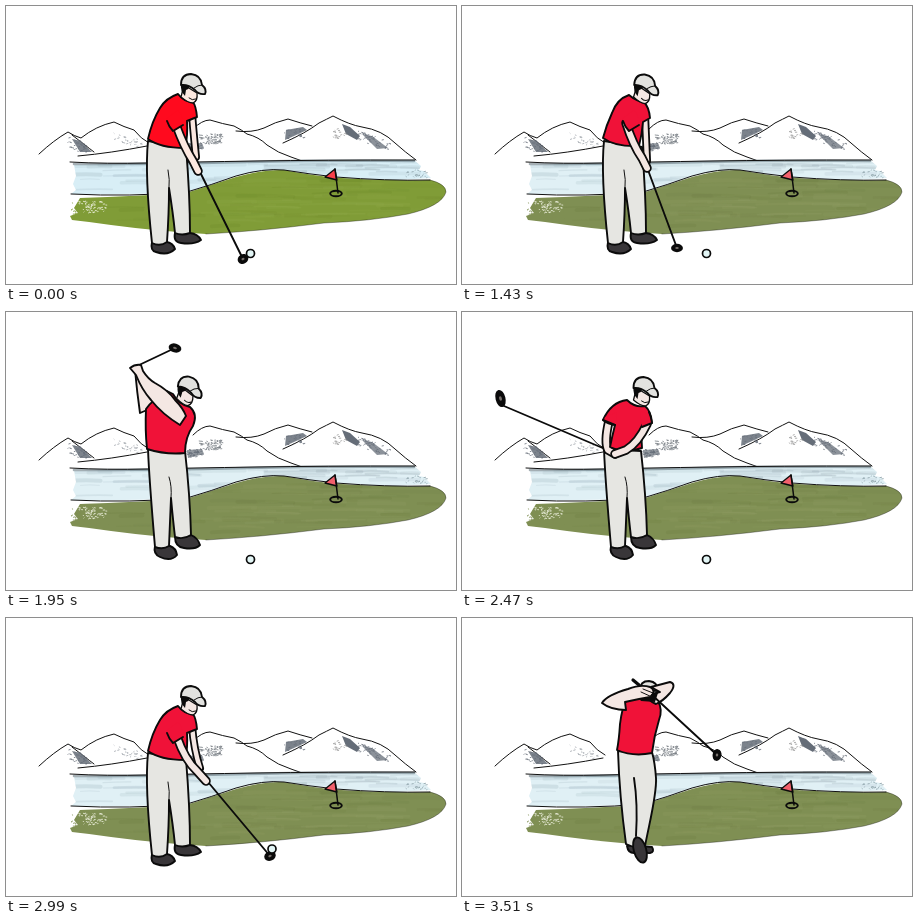
These frames come from a looping animation (450x278 px, 5200 ms). An HTML page:

```html
<!DOCTYPE html>
<html lang="en">
<head>
<meta charset="utf-8">
<title>Golf swing</title>
<style>
html, body { margin: 0; width: 100%; height: 100%; overflow: hidden; background: #fff; }
svg { display: block; width: 100%; height: 100%; --grass: #7f8f53; --dark: #68783d; --light: #93a168; --water: #e0f0f5; --red: #f01238; --skin: #f4e7e3; --flag: #f2606c; }
svg.bright { --grass: #809c37; --dark: #698528; --light: #91aa4c; --water: #d8eef6; --red: #ff0a1e; --skin: #fce8e0; --flag: #f8404a; }
path, ellipse, circle { stroke-linecap: round; stroke-linejoin: round; }
.thin { fill: none; stroke: #111; stroke-width: 1; }
.ink { stroke: #0b0b0b; stroke-width: 1.9; }
.cloth { fill: #e6e6e2; }
.shirt { fill: var(--red); }
.skin { fill: var(--skin); }
.cap { fill: #e2e2df; }
.shoe { fill: #393639; }
.black { fill: #0b0b0b; }
.line { fill: none; }
</style>
</head>
<body>
<svg id="stage" viewBox="0 0 450 278">
  <defs>
    <clipPath id="onGrass"><path id="grassShape" d="M74 192 Q130 190 180 187 Q205 179 230 171 Q258 163 278 164 Q302 169 335 172 Q385 175 424 174 Q440 178 440 186 Q436 200 402 208 Q365 215 318 217 Q255 225 200 228 Q150 225 105 219 Q85 216 66 214 L64 210 L72 207 L68 202Z"/></clipPath>
    <clipPath id="onWater"><path id="waterShape" d="M68 159 L140 157 L250 155 L408 154 L415 160 L413 164 L418 165 L425 172 L390 174 Q330 173 278 164 Q255 163 230 170 Q205 179 180 186 Q120 189 65 188 L70 184 L67 178 L70 170Z"/></clipPath>
  </defs>
  <g id="scene"></g>
  <g id="actor"></g>
</svg>
<script>
const stage = document.getElementById('stage');
const actor = document.getElementById('actor');
const STEP = 130, LOOP = 5200;

const path = (cls, d, extra = '') => `<path class="${cls}" d="${d}" ${extra}/>`;
const oval = (cls, x, y, rx, ry, turn = 0) =>
  `<ellipse class="${cls}" cx="${x}" cy="${y}" rx="${rx}" ry="${ry}" transform="rotate(${turn} ${x} ${y})"/>`;

let seed = 11;
const rnd = () => (seed = (seed * 16807) % 2147483647) / 2147483647;

// Dry brush specks inside a slanted box
function specks(x, y, w, h, count, colour, slope = 0) {
  let d = '';
  for (let i = 0; i < count; i++) {
    const u = rnd(), px = x + u * w, py = y + rnd() * h + u * w * slope;
    d += `M${px.toFixed(1)} ${py.toFixed(1)}l${(rnd() * 1.6).toFixed(1)} ${(rnd() - 0.5).toFixed(1)}`;
  }
  return `<path d="${d}" fill="none" style="stroke:${colour}" stroke-width=".8"/>`;
}

// Faint horizontal washes
function streaks(clip, x0, x1, y0, y1, count, colour) {
  let out = `<g clip-path="url(#${clip})" fill="none" style="stroke:${colour}">`;
  for (let i = 0; i < count; i++) {
    const x = x0 + rnd() * (x1 - x0), y = y0 + rnd() * (y1 - y0), l = 15 + rnd() * 50;
    out += `<path d="M${x.toFixed(1)} ${y.toFixed(1)}q${(l / 2).toFixed(1)} -1 ${l.toFixed(1)} ${(rnd() * 2 - 1).toFixed(1)}" stroke-width="${(1 + rnd() * 3).toFixed(1)}" opacity="${(0.08 + rnd() * 0.16).toFixed(2)}"/>`;
  }
  return out + '</g>';
}

function drawScene() {
  const slate = '#656d78';
  return [
    path('thin', 'M33 148 Q48 134 62 126 Q68 130 75 132 Q90 120 108 116 Q118 121 128 124 Q135 133 143 137'),
    path('thin', 'M66 129 Q79 139 88 146 M72 150 Q105 147 141 140'),
    path('thin', 'M187 123 Q196 114 204 114 Q217 118 228 120 Q236 124 241 128 Q253 131 261 139 Q272 147 285 151 L299 156'),
    path('thin', 'M230 125 Q246 127 258 122 Q269 116 282 113 Q294 117 306 120'),
    path('thin', 'M277 137 Q300 127 313 117 Q321 113 327 110 Q344 119 356 121 Q376 124 389 137 Q399 146 410 154'),
    `<g fill="${slate}">`,
    path('', 'M66 133 L75 135 L86 146 L74 146Z', 'opacity=".85"'),
    path('', 'M280 124 L297 121 L301 124 L288 130 L279 134Z', 'opacity=".85"'),
    path('', 'M336 118 L344 121 L354 130 L351 134 L340 128Z'),
    path('', 'M356 128 L366 130 L382 142 L371 143Z', 'opacity=".75"'),
    path('', 'M181 138 L196 137 L198 142 L182 146Z', 'opacity=".7"'),
    '</g>',
    specks(62, 131, 18, 12, 30, slate, .3),
    specks(108, 127, 27, 8, 30, '#a5aab0', .25),
    specks(193, 128, 23, 10, 85, '#777d83'),
    specks(180, 137, 16, 8, 40, slate),
    specks(278, 122, 20, 11, 25, slate),
    specks(326, 123, 15, 10, 20, '#999'),
    specks(352, 124, 32, 10, 50, slate, .35),
    '<use href="#waterShape" style="fill:var(--water)"/>',
    streaks('onWater', 60, 400, 156, 186, 32, '#8fa6b0'),
    streaks('onWater', 220, 390, 157, 168, 18, '#7f929c'),
    path('', 'M68 158 Q150 158 240 156 T408 155', 'fill="none" stroke="#5e7078" stroke-width="2.6" opacity=".55"'),
    path('thin', 'M64 156 Q100 158 142 157 T250 155 T409 154'),
    specks(400, 164, 22, 8, 22, '#8ba0a8'),
    '<use href="#grassShape" style="fill:var(--grass)"/>',
    streaks('onGrass', 70, 420, 168, 226, 40, 'var(--dark)'),
    streaks('onGrass', 190, 380, 172, 215, 40, 'var(--light)'),
    specks(65, 194, 38, 20, 90, 'var(--grass)'),
    specks(72, 195, 28, 12, 60, '#eef0df'),
    path('thin', 'M65 188 Q125 191 181 186 Q205 179 230 170 Q257 162 278 164 Q302 168 330 171 Q380 175 424 174'),
    path('thin', 'M424 174 Q440 178 440 186 Q436 200 402 208 Q365 215 318 217 Q255 225 200 228', 'opacity=".35"'),
    path('ink', 'M319 171 L329 163 L331 174Z', 'style="fill:var(--flag);stroke-width:1.3"'),
    path('ink line', 'M329 163 L332 187', 'style="stroke-width:1.5"'),
    oval('ink line', 330, 187.5, 5.8, 2.8)
  ].join('');
}

function limb(d, w = 9.5) {
  return path('line', d, `stroke="#0b0b0b" stroke-width="${w}"`) +
    path('line', d, `style="stroke:var(--skin)" stroke-width="${w - 3.6}"`);
}

const shaft = (x0, y0, x1, y1) => path('ink line', `M${x0} ${y0} L${x1} ${y1}`);

function clubHead(x, y, rx, ry, turn) {
  return oval('ink black', x, y, rx, ry, turn) +
    oval('', x, y, rx * .35, ry * .3, turn).replace('/>', ' fill="#77706c"/>');
}

const club = (x0, y0, x1, y1, rx = 5, ry = 3.5, turn = 0) =>
  shaft(x0, y0, x1, y1) + clubHead(x1, y1, rx, ry, turn);

const ball = (x, y) => `<circle cx="${x}" cy="${y}" r="4" fill="#e2f5f5" stroke="#0b0b0b" stroke-width="1.7"/>`;

function head(dx = 0, dy = 0, turn = 0) {
  return `<g transform="translate(${dx} ${dy}) rotate(${turn} 185 82)">` +
    path('skin', 'M178 79 L175 91 Q182 97 187 97 Q192 95 191 87Z', 'stroke="#0b0b0b" stroke-width="1.3"') +
    path('black', 'M175 78 L184 80 Q183 83 180 84 L179 90 Q174 85 175 78Z') +
    path('thin', 'M183 92 Q186 95 190 93') +
    path('ink cap', 'M175 79 Q175 68 185 68 Q195 69 196 79 Q201 83 199 88 Q193 89 189 84 Q182 78 175 79Z') +
    path('thin', 'M188 82 Q192 79 196 79') + '</g>';
}

const shoes = (a, b) => path('ink shoe', a) + path('ink shoe', b);

const legsStill =
  shoes('M146 236 Q144 245 150 246 Q162 250 169 243 Q167 237 161 236Z',
    'M169 227 Q167 236 175 237 Q188 239 195 234 Q192 228 184 227Z') +
  path('ink cloth', 'M142 135 C139 165 142 200 146 237 Q154 241 161 236 Q163 207 163 182 Q167 207 169 227 Q176 230 184 227 Q184 190 180 141Z') +
  path('thin', 'M163 182 Q164 174 162 164');

const legsTurned =
  shoes('M149 234 Q147 242 154 245 Q165 250 171 243 Q170 236 164 234Z',
    'M169 225 Q169 235 178 236 Q189 238 194 233 Q192 226 185 223Z') +
  path('ink cloth', 'M142 137 C143 165 146 200 149 235 Q157 238 163 234 Q164 210 165 186 Q167 208 169 225 Q177 228 185 223 Q184 183 179 139Z') +
  path('thin', 'M165 186 Q166 174 163 165');

const legsFinish =
  shoes('M180 228 Q182 236 188 235 Q193 234 190 229Z', 'M165 228 Q166 235 172 235 L174 226Z') +
  path('ink cloth', 'M156 133 C157 165 160 197 164 226 Q173 231 183 228 C188 202 195 176 194 160 Q193 145 190 134Z') +
  path('ink line', 'M172 160 Q176 186 174 218') +
  oval('ink shoe', 178, 232, 6.2, 13, -16);

const shirtStill = path('ink shirt', 'M172 88 Q160 92 154 102 Q146 115 142 133 Q154 142 179 142 Q182 130 181 115 Q186 113 191 111 Q190 100 187 96 Q178 96 172 88Z');
const shirtBack = path('ink shirt', 'M167 89 Q155 93 150 107 Q144 120 141 132 Q153 141 177 140 Q180 128 181 116 L188 112 Q187 101 182 96 Q174 95 167 89Z');
const shirtTurned = path('ink shirt', 'M165 88 Q149 90 141 108 Q146 112 153 113 Q150 125 148 135 Q163 142 180 136 Q179 124 181 115 L190 111 Q189 99 183 94 Q173 96 165 88Z');
const shirtTop = path('ink shirt', 'M161 79 Q147 87 140 97 Q139 118 141 137 Q160 143 179 141 Q179 125 187 114 Q192 102 184 95 Q172 92 167 82Z');

const sleeve = d => path('ink line', d);

function still(front, rear, tool, shirt = shirtStill, cap = head()) {
  return legsStill + limb(rear, 8) + shirt + cap + tool + limb(front) +
    path('shirt', 'M160 113 Q163 122 167 126 L177 119 Q177 109 172 104') +
    sleeve('M161 115 Q163 121 167 125 L177 119');
}

function turned(left, right, tool) {
  return legsTurned + tool + limb(left) + shirtTurned + head(-3.5, -3) + limb(right) +
    path('shirt', 'M178 99 L189 104 L190 111 L180 115Z') +
    path('shirt', 'M143 105 L155 100 L154 112 L142 108Z') +
    sleeve('M180 115 L190 111 Q189 104 187 100 M141 108 L153 113');
}

const raised = (left, right, tool) =>
  legsTurned + tool + left + shirtTop + head(-3.5, -3.5, 6) + right;

function finish(tool) {
  return legsFinish + path('ink cap', 'M178 72 Q178 63 187 63 Q196 64 196 73Z') +
    path('ink shirt', 'M164 83 Q160 90 158 106 Q157 122 155 132 Q171 139 190 135 Q192 118 197 102 Q201 92 196 83 Q180 77 164 83Z') +
    path('ink skin', 'M189 69 L208 64 Q215 66 208 75 Q201 83 194 86 Q186 83 186 77 L198 74Z') +
    path('black', 'M174 76 L196 75 L193 84 L179 83Z') +
    path('ink skin', 'M164 92 Q149 92 140 85 Q145 77 166 71 Q179 66 188 69 Q195 73 188 79 Q176 81 163 84Z') +
    path('thin', 'M179 74 L190 79 M181 71 L191 75') + tool;
}

const rest = ball(244.5, 247.5);
const address = still('M170 119 Q178 141 187 155 L192 165', 'M186 108 Q188 132 190 151',
  club(194, 166, 237, 253, 4.6, 3.8, -30)) + rest;
const takeaway = still('M164 117 Q171 139 180 152 L185 162', 'M183 109 Q184 132 185 155',
  club(186, 164, 215, 242, 5, 3.2), shirtBack, head(-3, .5, 3)) + rest;
const low = turned('M147 109 Q149 132 158 151', 'M184 112 Q176 137 160 152', club(158, 152, 105, 213, 5, 6, 40)) + rest;
const level = turned('M147 109 Q142 130 146 138 L153 142', 'M185 112 Q176 131 164 138 L153 142',
  shaft(150, 140, 42, 94) + clubHead(38.5, 86.5, 4, 7.8, -14)) + rest;
const upright = raised(limb('M142 101 Q124 101 120 84'), limb('M172 104 Q145 93 121 82', 11),
  club(120, 82, 106, 9, 4.5, 7, 10)) + rest;

const topLeft = path('ink skin', 'M129 58 Q131 80 134 101 L141 98 L150 88 Q141 84 138 66Z');
const topRight = path('ink skin', 'M124 56 Q129 52 135 53 L137 59 Q142 67 149 71 Q162 78 169 88 Q177 96 180 104 L174 113 Q156 102 145 88 Q136 78 130 63Z');
const top1 = raised(topLeft, topRight, club(131, 54, 169, 36, 5.5, 3.5, 15)) + rest;
const top2 = raised(topLeft, topRight, club(131, 54, 181, 44, 5.5, 3.5, 25)) + rest;

const impact = still('M171 119 Q179 142 191 153 L200 163', 'M186 108 Q188 132 194 150',
  club(202, 164, 264, 238, 5, 3.8, -25)) + ball(266, 231);
const release = still('M172 119 Q190 134 218 145', 'M186 108 Q200 126 219 143',
  club(220, 145, 307, 172, 4, 6)) + ball(303, 137);
const follow = still('M172 117 Q198 119 222 105', 'M186 106 Q204 112 222 103',
  club(223, 104, 296, 61, 4, 6, 30)) + ball(335, 51);
const wrap = finish(club(188, 73, 111, 29, 4, 6, -30)) + ball(359, 4);
const end = finish(club(190, 77, 255, 137, 3.5, 5, 10) + path('ink line', 'M171 62 L177 67', 'style="stroke-width:3.2"'));

const swing = [takeaway, low, level, upright, top1, top2, top1, upright,
  level, low, takeaway, address, impact, release, follow, wrap];
const START = 11;

document.getElementById('scene').innerHTML = drawScene();

let shown = -1;
function update(ms) {
  const step = Math.floor((ms % LOOP) / STEP);
  if (step === shown) return;
  shown = step;
  stage.classList.toggle('bright', step === 0);
  actor.innerHTML = step < START ? address : swing[step - START] || end;
}

const begin = performance.now();
function tick() {
  update(performance.now() - begin);
  requestAnimationFrame(tick);
}
tick();
</script>
</body>
</html>
```
